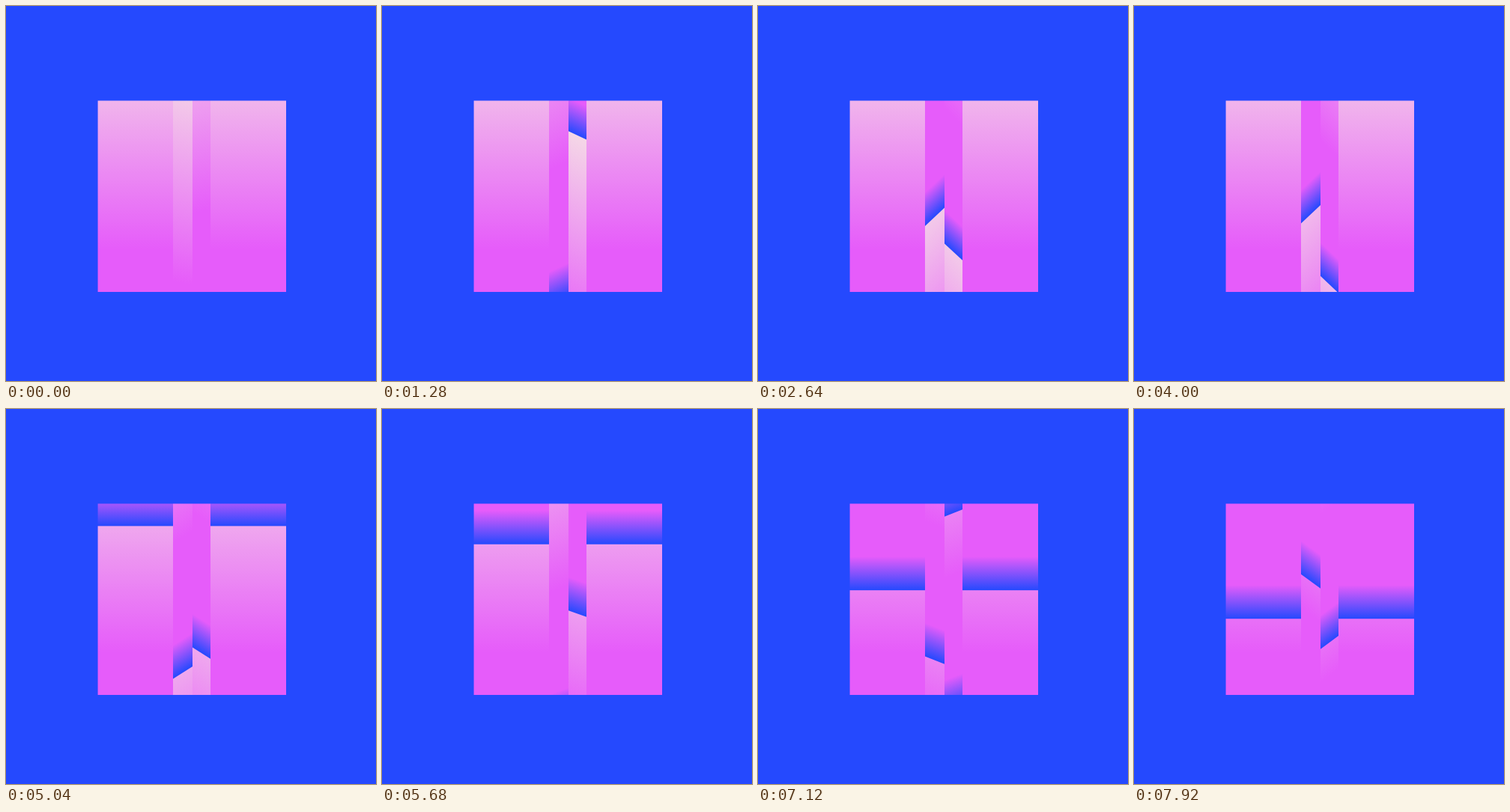
An HTML page with a canvas that plays this animation: 494x501 px, repeating every 8 s.

```html
<!DOCTYPE html>
<html lang="en">
<head>
<meta charset="utf-8">
<title>Sliding gradients</title>
<style>
  html, body { margin: 0; width: 100%; height: 100%; overflow: hidden; background: #2549fe; }
  canvas { display: block; width: 494px; height: 501px; }
</style>
</head>
<body>
<canvas id="stage" width="494" height="501"></canvas>
<script>
const ctx = document.getElementById('stage').getContext('2d');
const LOOP = 8000, STEP = 80;
const BLUE = '#2549fe', MAGENTA = '#e65cfa', PALE = '#f7ede3';
const TOP = 126.5, BOTTOM = 382;
const RAMP_END = 506, FADE = 45, PIVOT = -4;

const columns = [
  { left: 122.6, right: 223, lean: 0 },
  { left: 223, right: 249, lean: -1 },
  { left: 249, right: 273, lean: 1 },
  { left: 273, right: 374, lean: 0 }
];

const ramp = ctx.createLinearGradient(0, 0, 0, RAMP_END);
ramp.addColorStop(0, PALE);
ramp.addColorStop(325 / RAMP_END, MAGENTA);
ramp.addColorStop(1 - FADE / RAMP_END, MAGENTA);
ramp.addColorStop(1, BLUE);

// The hard edge speeds up downwards; the inner columns sway with a 12 s period.
const edgeAt = t => 27.4 + 14.5 * t + 2.2 * t * t;
const skewAt = t => 1.005 * Math.sin(Math.PI / 6 * (t - 0.36));

function drawColumn({ left, right, lean }, edge, skew) {
  const period = RAMP_END - edge;
  ctx.save();
  ctx.beginPath();
  ctx.rect(left, TOP, right - left, BOTTOM - TOP);
  ctx.clip();
  ctx.translate(PIVOT, 0);
  ctx.transform(1, lean * skew, 0, 1, 0, 0);
  ctx.translate(-PIVOT, -3 * period);
  ctx.fillStyle = ramp;
  for (let band = -3; band <= 3; band++) {
    ctx.fillRect(left - 2, edge, right - left + 4, period + 1);
    ctx.translate(0, period);
  }
  ctx.restore();
}

function draw(ms) {
  const t = Math.floor(ms / STEP) * STEP / 1000;
  const edge = edgeAt(t), skew = skewAt(t);
  ctx.fillStyle = BLUE;
  ctx.fillRect(0, 0, 494, 501);
  columns.forEach(column => drawColumn(column, edge, skew));
}

const start = performance.now();
function tick() {
  draw((performance.now() - start) % LOOP);
  requestAnimationFrame(tick);
}
tick();
</script>
</body>
</html>
```
